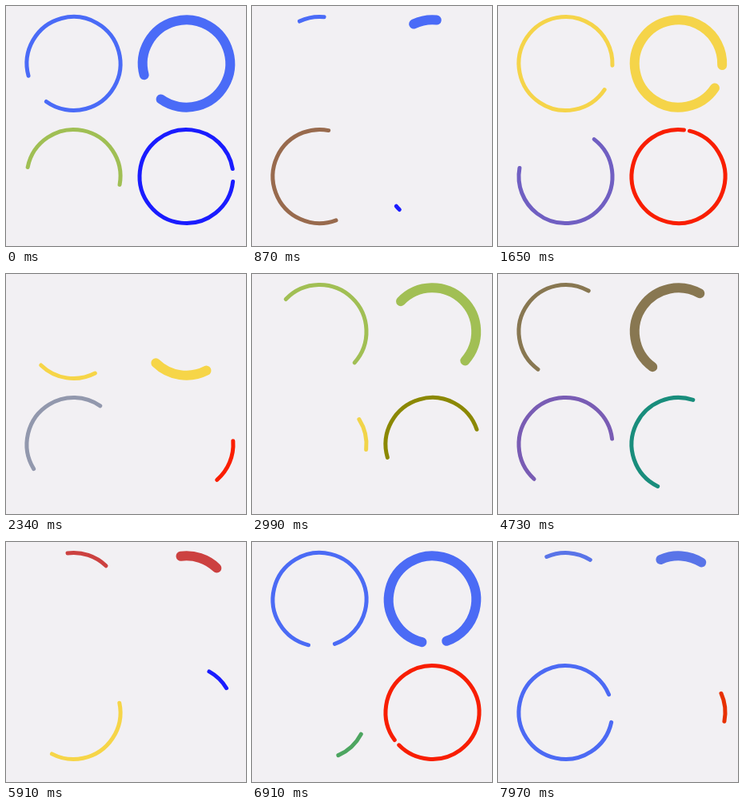
An HTML page with a canvas that plays this animation: 300 px wide and 300 px high, repeating every 8000 ms.

```html
<!DOCTYPE html>
<html lang="en">
<head>
<meta charset="utf-8">
<title>Circular progress spinners</title>
<style>
  html, body { margin: 0; width: 100%; height: 100%; overflow: hidden; background: #f2f0f3; }
  canvas { display: block; width: 100vmin; height: 100vmin; }
</style>
</head>
<body>
<canvas id="stage" width="300" height="300"></canvas>
<script>
const SIZE = 300;
const LOOP = 8000;
const BACKGROUND = '#f2f0f3';

const SOFT = [[204, 65, 64], [74, 107, 247], [246, 213, 72], [73, 168, 97]];
const VIVID = [[24, 245, 4], [26, 28, 255], [250, 30, 0]];

// start: when cycle 0 begins to grow; half: length of one growth or shrink.
const slow = { turn: 2000, half: 900, start: -986 };
const softSlow = { ...slow, min: 30, angle: 153, colors: SOFT, shift: 0 };
const spinners = [
  { ...softSlow, x: 84.5, y: 72, r: 58.5, width: 5 },
  { ...softSlow, x: 225.5, y: 72, r: 54.7, width: 12 },
  { x: 84.5, y: 213, r: 58.5, width: 5, min: 30, angle: 186,
    turn: 1000, half: 400, start: -184, colors: SOFT, shift: 2 },
  { ...slow, x: 225.5, y: 213, r: 58.5, width: 5, min: 5, angle: -7,
    colors: VIVID, shift: 0 }
];

// Uneven playback: [display time, step number, spinner clock].
const CLOCK = [
  [0, 0, 15], [1650, 28, 1671], [2990, 51, 3060], [4730, 81, 4851],
  [5910, 101, 6060], [6910, 118, 7060], [7970, 136, 8184]
];

const canvas = document.getElementById('stage');
const ctx = canvas.getContext('2d');

const mix = (a, b, f) => a + (b - a) * f;
const ease = x => (1 - Math.cos(Math.PI * x)) / 2;

function lookup(value, from, to) {
  let i = 1;
  while (i < CLOCK.length - 1 && value >= CLOCK[i][from]) i++;
  const a = CLOCK[i - 1], b = CLOCK[i];
  return mix(a[to], b[to], (value - a[from]) / (b[from] - a[from]));
}

function clockAt(time) {
  const step = Math.min(136, Math.floor(lookup(time, 0, 1) + 0.2));
  return lookup(step, 1, 2);
}

function drawSpinner(s, clock) {
  const phase = (clock - s.start) / s.half;
  const cycle = Math.floor(phase / 2);
  const part = phase - cycle * 2;
  const growing = part < 1;
  const amount = ease(growing ? part : part - 1);
  const travel = amount * (360 - 2 * s.min);

  const base = s.angle + clock * 360 / s.turn - cycle * 2 * s.min;
  const tail = growing ? base : base + travel;
  const sweep = growing ? s.min + travel : 360 - s.min - travel;

  const color = i => s.colors[(i + s.shift) % s.colors.length];
  const next = color(cycle + 1);
  const rgb = color(cycle).map((c, i) => Math.round(mix(c, next[i], growing ? amount : 1)));

  const rad = Math.PI / 180;
  const from = (tail % 360) * rad;
  ctx.beginPath();
  ctx.arc(s.x, s.y, s.r, from, from + sweep * rad);
  ctx.lineWidth = s.width;
  ctx.lineCap = 'round';
  ctx.strokeStyle = `rgb(${rgb.join(',')})`;
  ctx.stroke();
}

function fit() {
  const side = Math.min(innerWidth, innerHeight) || SIZE;
  const pixels = Math.round(side * (devicePixelRatio || 1));
  if (canvas.width !== pixels || canvas.height !== pixels) {
    canvas.width = canvas.height = pixels;
  }
  ctx.setTransform(pixels / SIZE, 0, 0, pixels / SIZE, 0, 0);
}

let begin = null;
function frame(now) {
  if (begin === null) begin = now;
  const clock = clockAt(Math.max(0, now - begin) % LOOP);
  fit();
  ctx.fillStyle = BACKGROUND;
  ctx.fillRect(0, 0, SIZE, SIZE);
  for (const s of spinners) drawSpinner(s, clock);
  requestAnimationFrame(frame);
}
requestAnimationFrame(frame);
</script>
</body>
</html>
```
